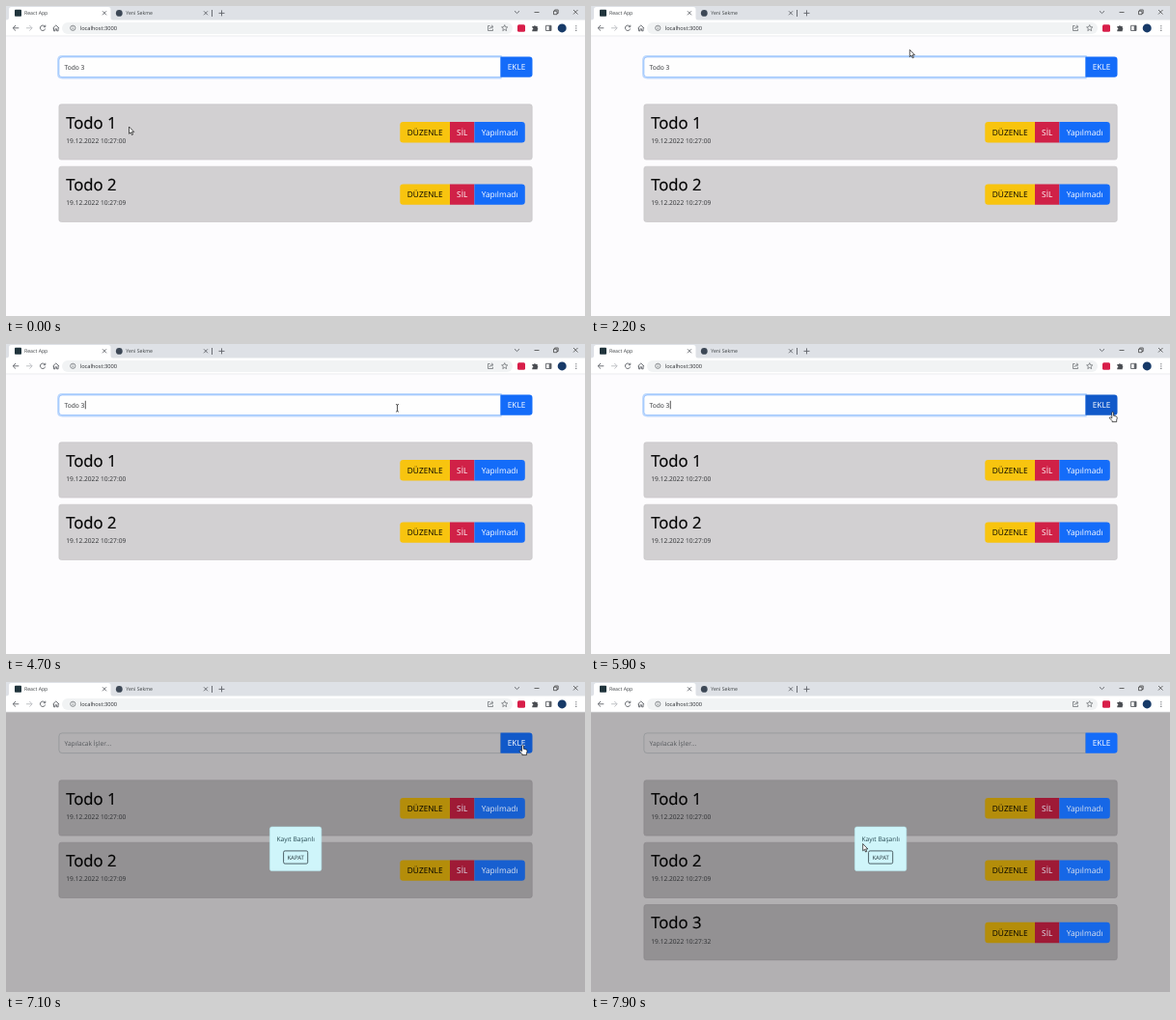
An HTML page for the animation above (8 s loop, 600 px wide and 321 px high).

```html
<!DOCTYPE html>
<html lang="tr">
<head>
<meta charset="utf-8">
<title>Todo</title>
<style>
  html, body { margin: 0; width: 100%; height: 100%; overflow: hidden; }
  svg {
    display: block; width: 100vw; height: 100vh;
    font-family: "Open Sans", "Noto Sans", sans-serif;
    text-rendering: geometricPrecision;
    --page: #fdfcfe; --card: #d2d0d2; --edge: #c3c1c3; --field: #fefefe; --line: #cdd2d8;
    --yellow: #f8c40f; --red: #d02147; --blue: #146cf9; --label: #fff;
  }
  svg.dim {
    --page: #b2b0b2; --card: #939193; --edge: #868486; --field: #b2b0b2; --line: #8f9296;
    --yellow: #b48d0a; --red: #9f1a36; --blue: #175fd0; --label: #dde3ee;
  }
  svg.dim.left { --blue: #1667e6; }
  .page { fill: var(--page); }
  .card { fill: var(--card); stroke: var(--edge); stroke-width: .6; }
  .field { fill: var(--field); stroke: var(--line); stroke-width: .7; }
  .focus .field { stroke: #86b7fe; }
  .glow { fill: none; stroke: #bcd8fd; stroke-width: 2.4; visibility: hidden; }
  .focus .glow { visibility: visible; }
  .yellow { fill: var(--yellow); }
  .red { fill: var(--red); }
  .blue { fill: var(--blue); }
  .add { fill: #146cf9; }
  .hover .add { fill: #1159c9; }
  .title { font-size: 16.7px; font-weight: 500; stroke: #000; stroke-width: .2; }
  .small { font-size: 6.65px; fill: #2b2d30; }
  .btn { font-size: 8.35px; text-anchor: middle; }
  .light { fill: var(--label); }
  .tab { font-size: 5.2px; fill: #3c4043; }
  .icon { fill: none; stroke: #5f6368; stroke-width: .9; }
  .dialog { visibility: hidden; text-anchor: middle; }
  .dim .dialog { visibility: visible; }
  .cursor { fill: #fff; stroke: #111; stroke-width: .7; stroke-linejoin: round; }
</style>
</head>
<body>
<svg id="stage" viewBox="0 0 600 321">
  <rect class="page" width="600" height="321"/>

  <!-- browser window -->
  <rect width="600" height="16" fill="#dee1e6"/>
  <path d="M0 14.5Q3 14.5 3 12V3.5Q3 1 5.500 1H106Q108.500 1 108.500 3.500V12Q108.500 14.500 111 14.500H600V31H0Z" fill="#fff"/>
  <path d="M0 31H600" stroke="#e3e4e7" stroke-width=".7"/>
  <rect x="9" y="3.800" width="7" height="7" rx=".8" fill="#20343c"/>
  <circle cx="117.300" cy="7.400" r="3.400" fill="#3d4856"/>
  <text class="tab" x="19" y="9.300">React App</text>
  <text class="tab" x="124.300" y="9.300">Yeni Sekme</text>
  <path class="icon" d="M100 5.300l4 4m0-4l-4 4M205 5.300l4 4m0-4l-4 4M213.500 4v7M220.500 7.400h6m-3-3v6M527 5.200l2.500 2.400 2.500-2.400"/>
  <path class="icon" style="stroke:#333;stroke-width:.7" d="M547.500 6.500h5M567.500 5.200h3.500v3.500h-3.500zM568.700 5.200v-1.200h3.500v3.500h-1.200M588 4l4.500 4.500m0-4.500l-4.500 4.500"/>
  <rect x="58" y="17" width="467" height="12" rx="6" fill="#f1f3f4"/>
  <path class="icon" d="M13.300 22.800h-6m2.700-2.800l-2.800 2.800 2.800 2.800M40.300 21.200a2.700 2.700 0 1 0 .4 2.300M40.800 19.700v2h-2"/>
  <path class="icon" style="stroke:#b9bcc0" d="M21 22.800h6m-2.700-2.800l2.800 2.800-2.800 2.800"/>
  <path class="icon" d="M48.500 23l3.300-3 3.300 3M49.500 22.500v3.300h1.500v-2h1.600v2h1.500v-3.300"/>
  <circle class="icon" cx="69.300" cy="22.800" r="2.600" style="stroke-width:.7"/>
  <path class="icon" style="stroke-width:.7" d="M69.300 22.500v1.700m0-3.200v.7"/>
  <text x="76.700" y="25" font-size="5.700" fill="#2a2c30">localhost:3000</text>
  <path class="icon" style="stroke-width:.7" d="M501.500 20.500h-2v5h5v-1.700M501 24q.4-2.500 3.300-2.500m-1.300-1.700l2 1.700-2 1.700"/>
  <path class="icon" style="stroke-width:.7" d="M516.700 19.600l.9 2.100 2.200.2-1.700 1.500.5 2.200-1.900-1.200-1.900 1.200.5-2.200-1.700-1.500 2.200-.2z"/>
  <rect x="530" y="19.300" width="8" height="7.400" rx="1.500" fill="#d81e49"/>
  <path fill="#4a4d52" d="M545.300 21h1.600a1.100 1.100 0 0 1 2.100 0h1.700v1.700a1.100 1.100 0 0 1 0 2v1.600h-5.400v-1.700a1 1 0 0 0 0-2z"/>
  <path class="icon" d="M559.500 20.300h5.500v5.200h-5.500z"/>
  <path fill="#5f6368" d="M562.700 20.300h2.300v5.200h-2.300z"/>
  <circle cx="576.200" cy="22.900" r="4.500" fill="#173a68"/>
  <path d="M590.800 20.200v6" stroke="#5f6368" stroke-width="1.100" stroke-dasharray="1.100 1.200"/>

  <!-- entry form -->
  <path class="glow" d="M512.500 52.300H58.300Q54.300 52.300 54.300 56.300V70.200Q54.300 74.200 58.300 74.200H512.500Z"/>
  <path class="field" d="M512.500 52.900H58.100Q54.900 52.900 54.900 56.100V70.400Q54.900 73.600 58.100 73.600H512.500Z"/>
  <text class="small" id="entry" x="60.500" y="65.600"></text>
  <path id="caret" d="M82.300 58.800V67.300" stroke="#111" stroke-width=".7"/>
  <path class="add" d="M512.500 52.500H542.300Q545.500 52.500 545.500 55.700V70.500Q545.500 73.700 542.300 73.700H512.500Z"/>
  <text class="btn" x="529" y="66.300" fill="#fff">EKLE</text>

  <g id="list"></g>

  <g class="dialog">
    <rect x="273.400" y="150" width="53.400" height="45.600" rx="2.200" fill="#cff5fa" stroke="#b8e9f0" stroke-width=".6"/>
    <text class="small" x="300.300" y="165" style="fill:#24474f">Kayıt Başarılı</text>
    <rect x="287.600" y="174.900" width="25.100" height="13.200" rx="1.500" fill="none" stroke="#2c3c42" stroke-width=".8"/>
    <text x="300.200" y="183.700" font-size="6" fill="#24363c">KAPAT</text>
  </g>

  <g class="cursor" id="cursor">
    <path id="arrow" d="M0 0V7.300L1.700 5.800 2.900 8.500 4.100 8 2.900 5.400H5.200Z"/>
    <path id="beam" fill="none" d="M-1.500 -3.700H-.5L0 -3.300 .5 -3.700H1.500M0 -3.300V3.300M-1.500 3.700H-.5L0 3.300 .5 3.700H1.500"/>
    <path id="hand" d="M-.9 .6Q0 -.7 .9 .6V4L2.200 4.200 3.600 4.700Q4.700 5 4.600 6.200L4 8.600V10.300H-.6V9.200L-3.300 6.500Q-3.500 5.200 -2.200 5.500L-.9 6.500Z"/>
  </g>
</svg>
<script>
const LOOP = 8000, STEP = 100;
const BLUR = 6800, SAVED = 7100, LISTED = 7200;
const $ = id => document.getElementById(id);
const stage = $('stage');

// pointer: time, x, y
const path = [
  [0, 127.5, 125], [900, 152, 130], [1800, 290, 90], [2200, 330.3, 45.3],
  [2600, 302, 20], [2900, 250, 23], [3300, 170, 50], [3700, 126.700, 62],
  [4100, 260, 60], [4500, 396, 43], [4700, 405.500, 66.300], [5000, 405.500, 66.300],
  [5500, 500, 67], [5800, 541, 72], [6100, 540, 67], [6300, 535.500, 65.300],
  [7600, 535.500, 65.300], [7700, 470, 100], [7900, 281.700, 167.500]
];

// box with rounded left (a) and right (b) corners
const box = (x, y, w, h, a, b) =>
  `M${x + a} ${y}h${w - a - b}q${b} 0 ${b} ${b}v${h - 2 * b}q0 ${b} ${-b} ${b}` +
  `h${a + b - w}q${-a} 0 ${-a} ${-a}v${2 * a - h}q0 ${-a} ${a} ${-a}z`;

const button = (x, w, a, b, color, label, text) =>
  `<path class="${color}" d="${box(x, 120, w, 21.4, a, b)}"/>
   <text class="btn ${text}" x="${x + w / 2}" y="133.900">${label}</text>`;

const row = (n, time) => `<g id="row${n}" transform="translate(0 ${(n - 1) * 64.4})">
  <rect class="card" x="54.900" y="101.800" width="490.300" height="57.300" rx="2.300"/>
  <text class="title" x="62.200" y="126.700">Todo ${n}</text>
  <text class="small" x="62.300" y="142">19.12.2022 10:27:${time}</text>
  ${button(408.3, 51.7, 3.2, 0, 'yellow', 'DÜZENLE', '')}
  ${button(460, 25.4, 0, 0, 'red', 'SİL', 'light')}
  ${button(485.4, 52.4, 0, 3.2, 'blue', 'Yapılmadı', 'light')}
</g>`;

$('list').innerHTML = row(1, '00') + row(2, '09') + row(3, '32');

const show = (id, on) => $(id).setAttribute('visibility', on ? 'inherit' : 'hidden');

function pointer(t) {
  const i = path.findIndex(p => p[0] > t);
  if (i < 0) return path[path.length - 1].slice(1);
  const [t0, x0, y0] = path[i - 1], [t1, x1, y1] = path[i];
  const k = (t - t0) / (t1 - t0);
  return [x0 + (x1 - x0) * k, y0 + (y1 - y0) * k];
}

function draw(t) {
  const [x, y] = pointer(t);
  const inForm = y > 52.5 && y < 74;
  const overField = inForm && x > 55 && x < 512.5;
  const overAdd = inForm && x >= 512.5 && x < 545.5;
  const saved = t >= SAVED;

  $('cursor').setAttribute('transform', `translate(${x} ${y})`);
  show('beam', overField);
  show('hand', overAdd);
  show('arrow', !overField && !overAdd);

  stage.classList.toggle('focus', t < BLUR);
  stage.classList.toggle('hover', overAdd);
  stage.classList.toggle('dim', saved);
  stage.classList.toggle('left', saved && !overAdd);

  show('caret', t < 6300 && (t + 730) % 1060 < 530);
  $('entry').textContent = saved ? 'Yapılacak İşler...' : 'Todo 3';
  $('entry').style.fill = saved ? '#55585c' : '';
  show('row3', t >= LISTED);
}

const start = performance.now();
function tick() {
  const t = (performance.now() - start) % LOOP;
  draw(Math.floor(t / STEP) * STEP);
  requestAnimationFrame(tick);
}
tick();
</script>
</body>
</html>
```
